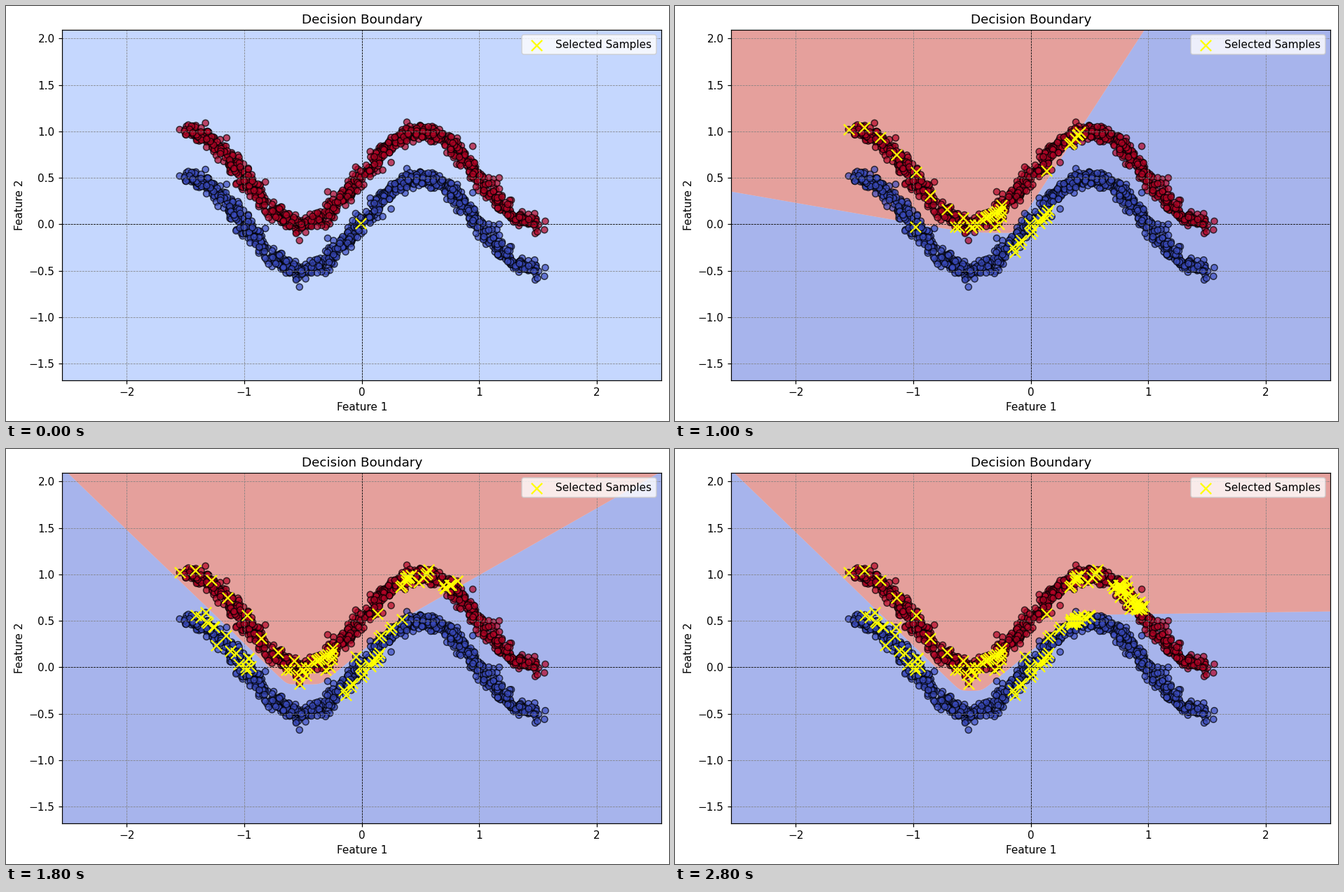
A matplotlib script that plays this animation: 946x592 px, repeating every 3 s.

```python
import numpy as np
import matplotlib.pyplot as plt
from matplotlib.animation import FuncAnimation

W, H, DPI = 946, 592, 110
FRAMES, STEP = 15, 200
XLIM, YLIM = (-2.549, 2.551), (-1.677, 2.095)
BATCH = 10
CMAP = plt.get_cmap("coolwarm")
IDLE, BLUE, RED = CMAP(.25), CMAP(.075 / 1.05), CMAP(.975 / 1.05)

# The most visible stray samples
STRAYS = [(-1.55, 1.02), (-1.33, 1.09), (-1.15, .93), (-1.07, .43), (-.82, .455),
          (-.53, -.175), (-.29, .35), (.25, .665), (.945, .84), (1.17, .5),
          (1.555, -.06)]

# Boundary over training: left height, left slope, floor, right height, right slope
KEY_STEPS = [3, 4, 5, 7, 9, 11, 14]
KEY_SHAPES = np.array([
    [-.295, .14, -.5, 13, 15],
    [0, -.02, -.05, 1.265, 1.5],
    [.355, -.22, -.09, 1.385, 1.95],
    [1.56, -.87, -.15, .797, 1.03],
    [2.15, -1.22, -.18, .71, .72],
    [2.125, -1.22, -.22, .597, .527],
    [2.125, -1.22, -.25, .57, .018],
])
FIRST_FIT = KEY_STEPS[0]
RISE = 1.03

# Picks before the first usable fit: step, x from, x to, count, shift off the wave
EARLY = [(0, .01, .01, 1, -.5), (1, 0, .17, 10, -.6), (2, -.39, -.31, 6, .04),
         (2, -.17, -.07, 4, -.56), (3, -1.55, -.3, 10, .05)]


def wave(x):
    return .5 + .5 * np.sin(np.pi * x)


def make_samples(n=980):
    rng = np.random.default_rng(7)
    x = rng.uniform(-1.49, 1.49, n)
    noise = np.clip(rng.normal(0, .038, (n, 2)), -.1, .1)
    pts = np.vstack([np.column_stack([x, wave(x)]) + noise, STRAYS])
    return rng.permutation(pts)


def boundary(step, x):
    y0, m0, floor, y1, m1 = [np.interp(step, KEY_STEPS, col) for col in KEY_SHAPES.T]
    fall = y0 + m0 * (x + 2.55)
    tail = y1 + m1 * (x - .6)
    if m1 < RISE:
        tail = np.minimum(tail, .18 + RISE * x)
    soft = .02
    lines = np.array([fall, np.full_like(x, floor), tail])
    return soft * np.logaddexp.reduce(lines / soft)


def select(pts):
    """Pick the samples the previous fit is least sure about."""
    taken = []

    def take(dist):
        dist[taken] = np.inf
        taken.append(int(np.argmin(dist)))

    counts = []
    for step in range(FRAMES):
        for _, x0, x1, n, shift in [e for e in EARLY if e[0] == step]:
            for x in np.linspace(x0, x1, n):
                take(np.hypot(pts[:, 0] - x, pts[:, 1] - wave(x) - shift))
        if step > FIRST_FIT:
            x, y = pts.T
            b = boundary(step - 1, x)
            slope = (boundary(step - 1, x + .01) - b) / .01
            for _ in range(BATCH):
                take(np.abs(y - b) / np.hypot(1, slope))
        counts.append(len(taken))
    return pts[taken], counts


fig = plt.figure(figsize=(W / DPI, H / DPI), dpi=DPI)
left, right, top, bottom = 80.3, 935.3, 33.8, 533.6
ax = fig.add_axes([left / W, 1 - bottom / H, (right - left) / W, (bottom - top) / H])

upper = make_samples()
points = np.vstack([upper, upper - (0, .5)])
labels = np.repeat([1, 0], len(upper))
picks, counts = select(points)

ax.scatter(*points.T, c=labels, cmap=CMAP, edgecolor="k", alpha=.7)
marks = ax.scatter([], [], color="yellow", marker="x", s=100, label="Selected Samples")

ax.axhline(0, color="black", lw=.5, ls="--")
ax.axvline(0, color="black", lw=.5, ls="--")
ax.grid(True, color="gray", ls="--", lw=.5)
ax.set(xlim=XLIM, ylim=YLIM, title="Decision Boundary",
       xlabel="Feature 1", ylabel="Feature 2")
ax.legend(loc="upper right")

gx = np.linspace(XLIM[0] - .01, XLIM[1] + .01, 800)
low, high = YLIM[0] - .01, YLIM[1] + .01
regions = []


def fill(y0, y1, color):
    regions.append(ax.fill_between(gx, y0, y1, color=color, alpha=.5, lw=0, zorder=.5))


def draw(i):
    while regions:
        regions.pop().remove()
    if i < FIRST_FIT:
        fill(low, high, IDLE)
    else:
        edge = np.clip(boundary(i, gx), low, high)
        fill(low, edge, BLUE)
        fill(edge, high, RED)
    marks.set_offsets(picks[:counts[i]])
    return [*regions, marks]


anim = FuncAnimation(fig, draw, frames=FRAMES, interval=STEP,
                     init_func=lambda: draw(0), repeat=True, repeat_delay=0)
plt.show()
```
